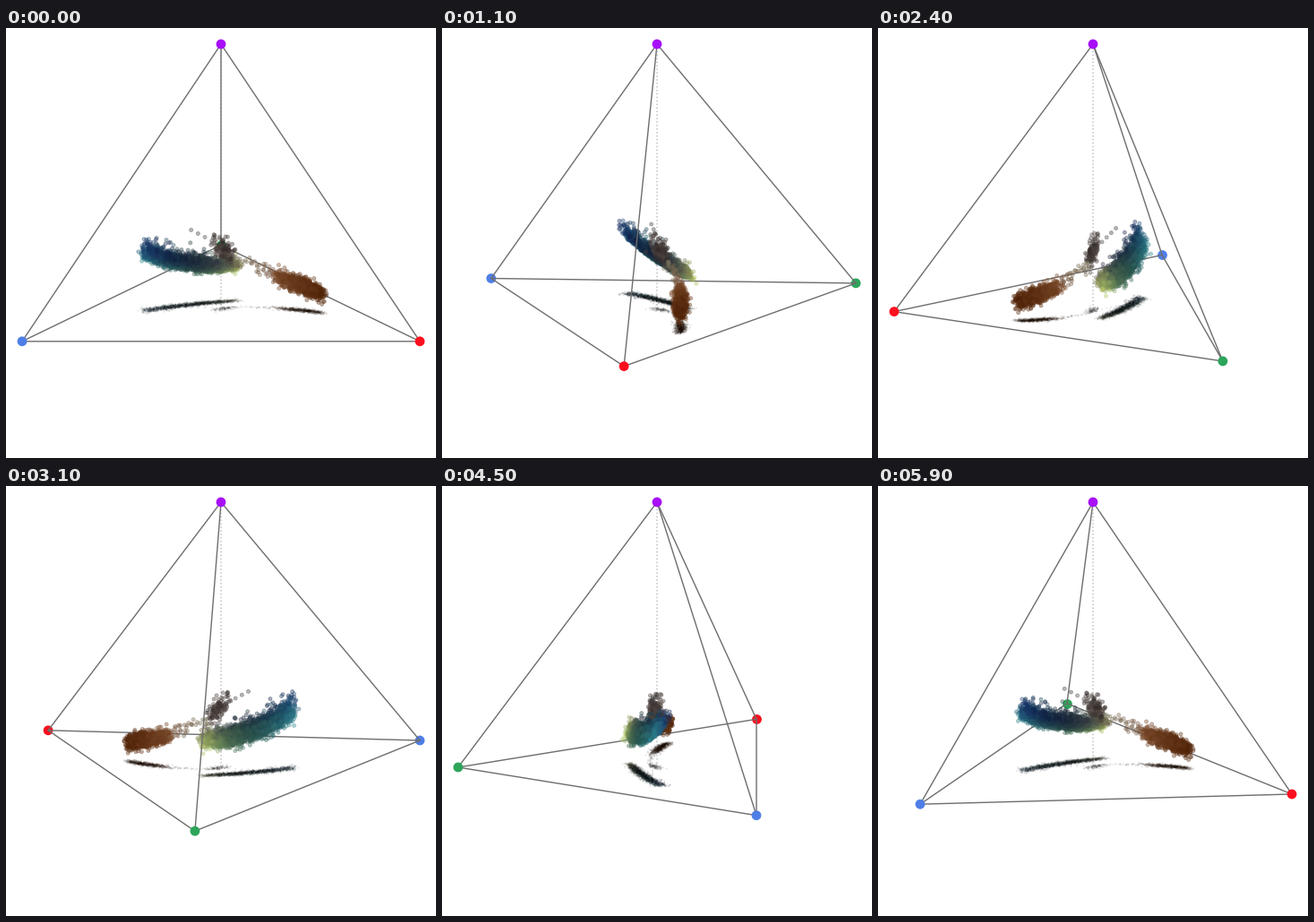
Write a matplotlib script that moves like this. It is 480x480 px and loops after 6 s.

```python
import numpy as np
import matplotlib.pyplot as plt
from matplotlib.animation import FuncAnimation
from matplotlib.collections import LineCollection
from matplotlib.colors import to_rgb
from itertools import combinations

SIZE, DPI, FRAMES = 480, 100, 60
PX = 72 / DPI
CX, CY, HALF_W = 240, 314, 222
DEPTH, HEIGHT = 62, 296

# Solid corners as (across, depth, height in pixels).
turns = 2 * np.pi * np.arange(3) / 3
base = np.column_stack([np.sin(turns), 2 / 3 ** 0.5 * np.cos(turns), 0 * turns])
CORNERS = np.vstack([base, [0, 0, HEIGHT]])
CORNER_COLORS = np.array(["#2ca55a", "#fc0f1e", "#4f7fe6", "#a80ff8"])
EDGES = np.array(list(combinations(range(4), 2)))

rng = np.random.default_rng(8)


def mix(start, end, t):
    a, b = np.array(to_rgb(start)), np.array(to_rgb(end))
    return a + (b - a) * t[:, None]


def noise(n, sigma):
    return rng.normal(0, sigma, n)


def teal_cloud(n=2000):
    t = rng.beta(1.4, 1.4, n)
    taper = 1 - 0.35 * t
    side = noise(n, 0.024) * taper
    x = -0.345 + 0.42 * t + noise(n, 0.01)
    d = -0.03 + 0.19 * t + 0.02 * np.sin(np.pi * t) + side
    z = 68 - 62 * t + 34 * t ** 2
    # Dense below, thinning out upwards.
    z += -200 * side + (rng.gamma(2.2, 3.2, n) - 7) * taper
    color = mix("#245e7e", "#969b5a", t ** 2)
    color *= 1 - 0.4 * np.sin(np.pi * t)[:, None]
    tilt = np.clip(side / 0.045, -1, 1)[:, None]
    color *= 1 + tilt * [0.4, 0.5, 0.18]
    return np.column_stack([x, d, z]), color


def brown_cloud(n=850):
    s = rng.beta(3, 2.1, n)
    x = 0.2 + 0.26 * s + noise(n, 0.007)
    d = 0.03 - 0.05 * s - 0.055 * s ** 2 + noise(n, 0.017)
    z = 38 - 18 * s + noise(n, 4.3)
    return np.column_stack([x, d, z]), mix("#7c4c2c", "#522408", s)


def grey_cloud(n=120):
    x = 0.012 + noise(n, 0.025)
    d = 0.005 + 0.5 * x + noise(n, 0.018)
    z = 67 - 200 * x + noise(n, 5.5)
    return np.column_stack([x, d, z]), mix("#2c2626", "#564a44", rng.random(n))


def bridge(n=38):
    u = rng.random(n)
    x = 0.05 + 0.18 * u
    d = 0.04 - 0.01 * u + noise(n, 0.012)
    z = 52 - 13 * u + noise(n, 4)
    return np.column_stack([x, d, z]), mix("#78745a", "#7c5a46", u)


def strays(n=4):
    i = np.arange(n)
    pos = np.column_stack([-0.13 + 0.03 * i, np.full(n, 0.025), 87 - 4 * i])
    return pos, mix("#424242", "#424242", i)


parts = [teal_cloud(), brown_cloud(), grey_cloud(), bridge(), strays()]
points = np.vstack([p for p, _ in parts])
colors = np.vstack([c for _, c in parts])
colors = np.clip(colors + rng.normal(0, 0.02, (len(points), 1)), 0, 1)
floor = points * [1, 1, 0]


def with_alpha(rgb, alpha):
    return np.column_stack([rgb, np.full(len(rgb), alpha)])


def project(pos, angle, scale):
    """Return screen positions and depth after turning about the axis."""
    c, s = np.cos(angle), np.sin(angle)
    across = pos[:, 0] * c + pos[:, 1] * s
    depth = pos[:, 1] * c - pos[:, 0] * s
    screen = np.column_stack([CX + scale * across,
                              CY - DEPTH * depth - pos[:, 2]])
    return screen, depth


fig = plt.figure(figsize=(SIZE / DPI, SIZE / DPI), dpi=DPI, facecolor="white")
ax = fig.add_axes([0, 0, 1, 1])
ax.set(xlim=(0, SIZE), ylim=(SIZE, 0))
ax.axis("off")


def dots(diameter, zorder, edge=0):
    return ax.scatter([], [], s=(diameter * PX) ** 2, zorder=zorder,
                      linewidths=edge * PX)


def edge_set(zorder):
    lines = LineCollection([], colors="#6e6e6e", linewidths=1.4 * PX,
                           capstyle="round", snap=False, zorder=zorder)
    return ax.add_collection(lines)


ax.plot([CX, CX], [CY - HEIGHT, CY], color="#b8b8b8", lw=1.4 * PX,
        ls=(0, (1, 1.8)), snap=False, zorder=1)
far_corners = dots(10.8, 2)
far_edges = edge_set(3)
shadow = dots(1.9, 4)
cloud = dots(4.1, 5, edge=0.8)
near_edges = edge_set(6)
near_corners = dots(10.8, 7)

shadow.set_facecolor(with_alpha(colors * 0.3, 0.11))
rgba = with_alpha(colors, 0.38)


def draw(frame):
    angle = 2 * np.pi * frame / FRAMES
    flat, _ = project(CORNERS, angle, 1)
    # The view always fits the widest base corner.
    scale = HALF_W / np.abs(flat[:, 0] - CX).max()

    corners, depth = project(CORNERS, angle, scale)
    far = depth > 1e-6
    for group, mask in ((far_corners, far), (near_corners, ~far)):
        group.set_offsets(corners[mask])
        group.set_facecolor(CORNER_COLORS[mask])

    far = depth[EDGES].mean(axis=1) > 1e-6
    far_edges.set_segments(corners[EDGES[far]])
    near_edges.set_segments(corners[EDGES[~far]])

    shadow.set_offsets(project(floor, angle, scale)[0])
    screen, depth = project(points, angle, scale)
    order = np.argsort(-depth)
    cloud.set_offsets(screen[order])
    cloud.set_facecolor(rgba[order])
    cloud.set_edgecolor(rgba[order])
    return far_corners, far_edges, shadow, cloud, near_edges, near_corners


anim = FuncAnimation(fig, draw, frames=FRAMES, interval=1000 * 6 // FRAMES,
                     repeat=True, repeat_delay=0)
plt.show()
```
